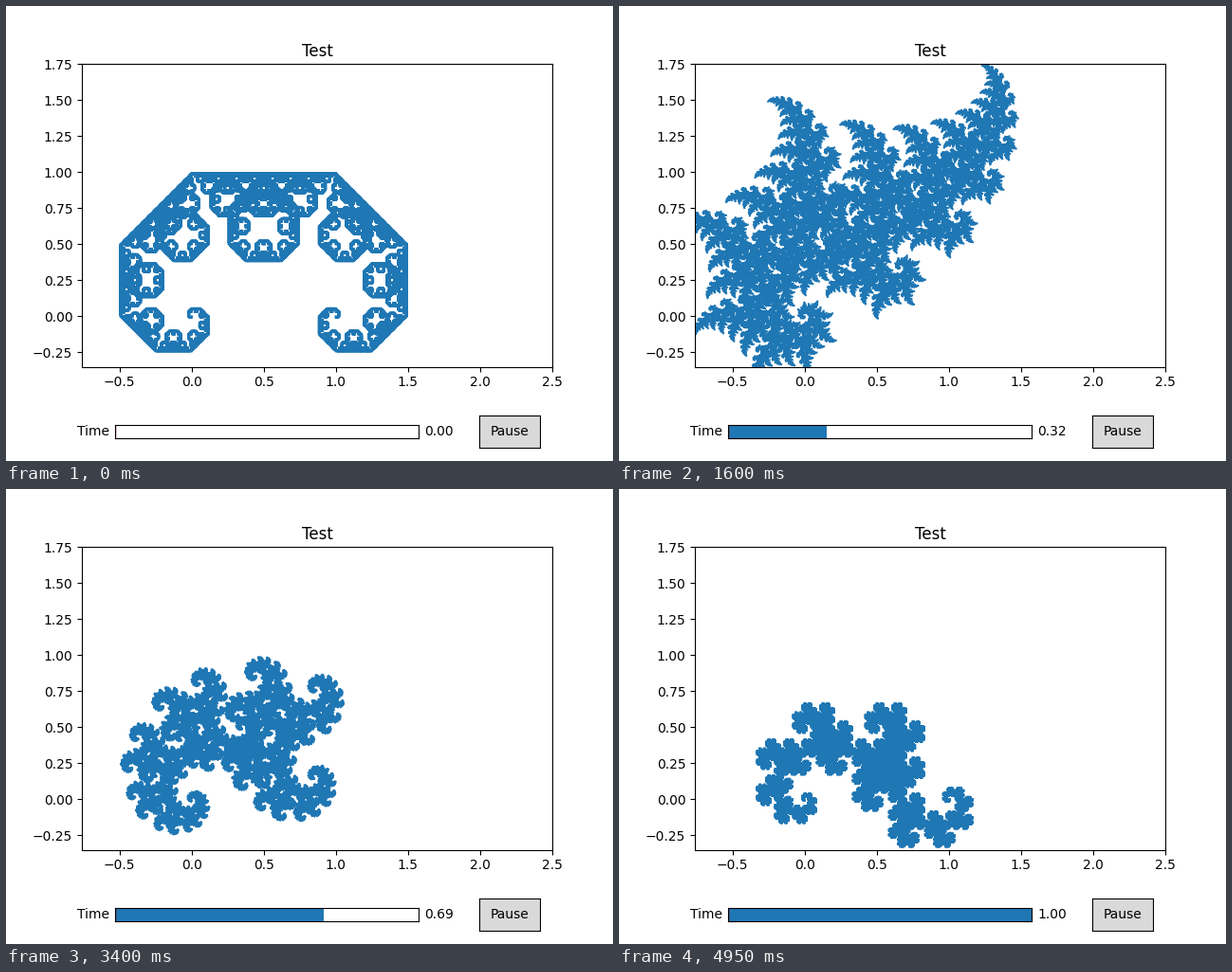
Recreate the animation shown at these times as a matplotlib script. Size 640 px wide and 480 px high, loop 5000 ms.

```python
import numpy as np
import matplotlib.pyplot as plt
from matplotlib.animation import FuncAnimation

FRAMES = 100
INTERVAL = 50
DEPTH = 14

plt.rcParams["path.simplify"] = False


def fractal(t):
    """Segments of the attractor between the Levy C curve (t=0) and the dragon (t=1)."""
    a = (1 + 1j) / 2
    b = np.sqrt(0.5) * np.exp(1j * np.pi * (t - 0.25))
    c = (1 - t) * a + t
    z = np.array([[0, 1]], dtype=complex)
    for _ in range(DEPTH):
        z = np.concatenate([a * z, b * z + c])
    # A NaN after each segment lifts the pen.
    gap = np.full((len(z), 1), np.nan)
    x = np.hstack([z.real, gap]).ravel()
    y = np.hstack([z.imag, gap]).ravel()
    return x, y


def widget_axes(rect, color):
    w = fig.add_axes(rect, facecolor=color)
    w.set(xticks=[], yticks=[], xlim=(0, 1), ylim=(0, 1))
    return w


fig, ax = plt.subplots(figsize=(6.4, 4.8), dpi=100)
fig.subplots_adjust(bottom=0.2)
ax.set_title("Test")
ax.set_aspect("equal")
ax.set(xlim=(-0.76, 2.5), ylim=(-0.35, 1.75))
ax.set_xticks(np.arange(-0.5, 2.6, 0.5))
ax.set_yticks(np.arange(-0.25, 1.8, 0.25))
curve, = ax.plot([], [], color="C0", lw=1.5)

slider = widget_axes([0.18, 0.05, 0.5, 0.03], "white")
bar = plt.Rectangle((0, 0), 0, 1, facecolor="C0", edgecolor="none")
slider.add_patch(bar)
slider.axvline(0, color="r", lw=1)
slider.text(-0.02, 0.5, "Time", ha="right", va="center")
value = slider.text(1.02, 0.5, "0.00", ha="left", va="center")

button = widget_axes([0.78, 0.03, 0.1, 0.07], "0.85")
button.text(0.5, 0.5, "Pause", ha="center", va="center")


def update(i):
    t = i / (FRAMES - 1)
    curve.set_data(*fractal(t))
    bar.set_width(t)
    value.set_text(f"{t:.2f}")
    return curve, bar, value


anim = FuncAnimation(fig, update, frames=FRAMES, interval=INTERVAL,
                     repeat=True, repeat_delay=0)
plt.show()
```
